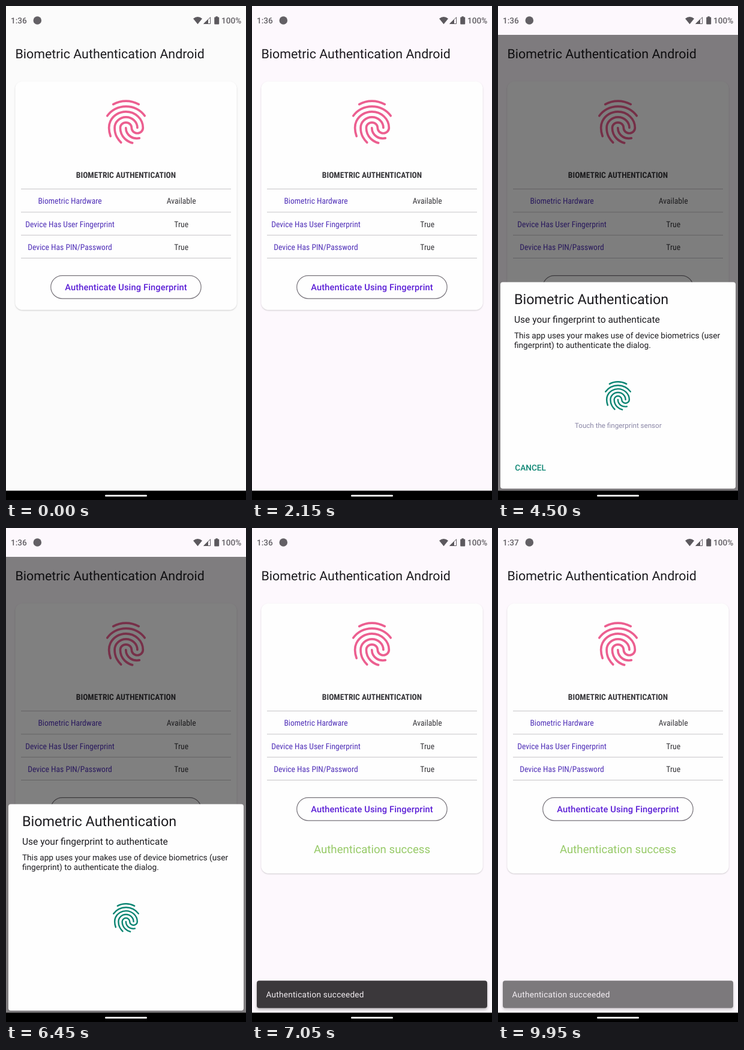
Animation, 400 px wide and 822 px high, one loop 10 s. Source, as an HTML page:

```html
<!DOCTYPE html>
<html lang="en">
<head>
<meta charset="utf-8">
<style>
html, body { margin: 0; width: 100%; height: 100%; overflow: hidden; background: #fdf8fd; }
svg { display: block; width: 400px; height: 822px; }
text { font: 13.62px Roboto, sans-serif; fill: #1c1b1f; text-rendering: geometricPrecision; white-space: pre; }
.mid { text-anchor: middle; }
.med { font-weight: 500; }
.cond { font-family: "Roboto Condensed", Roboto, sans-serif; font-stretch: condensed; fill: #37363a; }
.cond.tight { font-size: 13px; letter-spacing: -.6px; }
.label { fill: #5030b8; }
.status text { fill: #636065; font-weight: 500; }
.print { fill: none; stroke-width: 1; stroke-linecap: round; stroke-linejoin: round; }
</style>
</head>
<body>
<svg viewBox="0 0 400 822">
  <defs>
    <filter id="soft" x="-5%" y="-5%" width="110%" height="112%">
      <feDropShadow dx="0" dy="1" stdDeviation="1" flood-color="#000" flood-opacity=".22"/>
    </filter>
    <filter id="lift" x="-5%" y="-20%" width="110%" height="150%">
      <feDropShadow dx="0" dy="2.5" stdDeviation="2.5" flood-color="#000" flood-opacity=".3"/>
    </filter>
    <g id="print" class="print">
      <path d="M17.81 3.97C15.86 2.96 14.08 2.5 12.01 2.5C9.94 2.5 7.98 2.99 6.2 3.97"/>
      <path d="M3.5 9.22C4.44 7.89 5.63 6.84 7.06 6.1C10.07 4.55 13.91 4.54 16.92 6.09C18.35 6.83 19.54 7.87 20.49 9.19"/>
      <path d="M9.75 21.29C8.93 20.47 8.47 19.95 7.82 18.77C7.17 17.61 6.84 16.17 6.84 14.66C6.84 11.97 9.15 9.77 12 9.77S17.16 11.97 17.16 14.66"/>
      <path d="M11.94 14.66C11.94 16.24 12.75 17.73 14.1 18.64C14.88 19.17 15.83 19.44 16.92 19.44Q17.5 19.44 18.09 19.33"/>
      <path d="M14.91 21.5C13.41 21.09 12.43 20.54 11.41 19.52C10.1 18.23 9.39 16.5 9.39 14.66C9.39 13.31 10.54 12.22 11.97 12.22S14.55 13.31 14.55 14.66S15.7 17.1 17.13 17.1S19.71 16.01 19.71 14.66C19.71 10.61 16.24 7.33 11.96 7.33C8.92 7.33 6.16 9.03 4.9 11.65C4.48 12.53 4.27 13.54 4.27 14.66C4.27 15.44 4.35 16.82 4.97 18.45"/>
    </g>
  </defs>

  <rect id="page" width="400" height="822"/>

  <g class="status">
    <text id="clock" x="8" y="29">1:36</text>
    <circle cx="52.3" cy="24" r="6.8" fill="#636065"/>
    <g fill="#5c595e">
      <path d="M319.5 30.3L312 20.9Q319.5 14.9 327 20.9Z"/>
      <path d="M329 30L337 22V30Z"/>
      <path d="M329.8 29.5L340.6 18.8V29.5Z" fill="none" stroke="#5c595e"/>
      <path d="M349.5 17.3H352.8V18.6H354.2Q355.2 18.6 355.2 19.6V29.4Q355.2 30.4 354.2 30.4H348.2Q347.2 30.4 347.2 29.4V19.6Q347.2 18.6 348.2 18.6H349.5Z"/>
    </g>
    <text x="359" y="29">100%</text>
  </g>

  <text x="15.5" y="87.3" style="font-size:21.4px">Biometric Authentication Android</text>

  <rect id="card" x="15.5" y="125.5" width="369" height="380" rx="12" fill="#fefefe" filter="url(#soft)"/>
  <use href="#print" transform="translate(200 193) scale(3.67) translate(-12 -12)" stroke="#ec5f90"/>
  <text id="head" class="cond mid" x="200" y="286" style="font-weight:700">BIOMETRIC AUTHENTICATION</text>
  <path d="M25 304.5H375M25 343H375M25 381.3H375M25 419.5H375" stroke="#c6c4c7"/>
  <g id="rows"></g>
  <rect x="74.7" y="448.6" width="250.4" height="38.2" rx="19.1" fill="none" stroke="#77737a" stroke-width="1.2"/>
  <text class="mid med" x="200" y="473.2" style="font-size:14.6px;letter-spacing:.15px;fill:#5b1fd6">Authenticate Using Fingerprint</text>
  <text id="done" class="mid" x="200" y="540.6" style="font-size:18.65px;fill:#97ca68">Authentication success</text>

  <rect id="dim" y="48" width="400" height="759"/>

  <g id="sheet">
    <rect x="4" y="459.5" width="392" height="343.5" rx="4" fill="#fefefe"/>
    <text x="27" y="496" style="font-size:23.35px">Biometric Authentication</text>
    <text x="27" y="526.6" style="font-size:15.55px">Use your fingerprint to authenticate</text>
    <text x="27" y="553">This app uses your makes use of device biometrics (user</text>
    <text x="27" y="569.4">fingerprint) to authenticate the dialog.</text>
    <use href="#print" transform="translate(200 648.5) scale(2.44) translate(-12 -12)" stroke="#0c8573"/>
    <g id="hint">
      <text class="mid" x="200.3" y="702.3" style="font-size:11.6px;fill:#8a86a6">Touch the fingerprint sensor</text>
      <text class="med" x="28.3" y="773" style="fill:#0c8573">CANCEL</text>
    </g>
  </g>

  <g id="snack">
    <rect x="8" y="753.3" width="384" height="45.4" rx="4" fill="#3a373a" filter="url(#lift)"/>
    <text x="23.5" y="781" style="letter-spacing:.24px;fill:#f2edf1">Authentication succeeded</text>
  </g>

  <rect y="806.5" width="400" height="15.5"/>
  <rect x="165" y="813.6" width="70" height="2.6" rx="1.3" fill="#fff"/>
</svg>
<script>
const LOOP = 10000;
const el = id => document.getElementById(id);
const set = (id, name, value) => el(id).setAttribute(name, value);
const ramp = (t, from, to) => Math.min(1, Math.max(0, (t - from) / (to - from)));
const easeOut = p => 1 - (1 - p) ** 3;
const easeIn = p => p * p;

el("rows").innerHTML = [
  ["Biometric Hardware", "Available"],
  ["Device Has User Fingerprint", "True"],
  ["Device Has PIN/Password", "True"]
].map(([name, value], i) => {
  const y = 329.2 + i * 38.3;
  return `<text class="cond mid label" x="106.5" y="${y}">${name}</text>
    <text class="cond mid" x="292.2" y="${y}">${value}</text>`;
}).join("");

// Tighter spacing when no condensed face is available
if (el("head").getComputedTextLength() > 178)
  document.querySelectorAll(".cond").forEach(n => n.classList.add("tight"));

function draw(t) {
  const tint = ramp(t, 0, 1000);
  set("page", "fill", `rgb(${251 + 2 * tint},${251 - 3 * tint},${251 + 2 * tint})`);
  el("clock").textContent = t < 9400 ? "1:36" : "1:37";

  const open = easeOut(ramp(t, 4000, 4300));
  const close = ramp(t, 6450, 6800);
  set("dim", "opacity", 0.5 * open * (1 - close));
  set("sheet", "transform", `translate(0 ${350 * (1 - open + easeIn(close))})`);
  set("sheet", "visibility", open > 0 && close < 1 ? "visible" : "hidden");
  set("hint", "opacity", 1 - ramp(t, 6050, 6200));

  const success = t >= 6850;
  set("card", "height", success ? 449 : 380);
  set("done", "visibility", success ? "visible" : "hidden");

  const show = easeOut(ramp(t, 6850, 7000));
  const scale = 0.8 + 0.2 * show;
  set("snack", "opacity", show * (1 - 0.34 * ramp(t, 9900, 9950)));
  set("snack", "transform", `translate(200 776) scale(${scale}) translate(-200 -776)`);
}

const start = performance.now();
function tick() {
  draw((performance.now() - start) % LOOP);
  requestAnimationFrame(tick);
}
draw(0);
requestAnimationFrame(tick);
</script>
</body>
</html>
```
